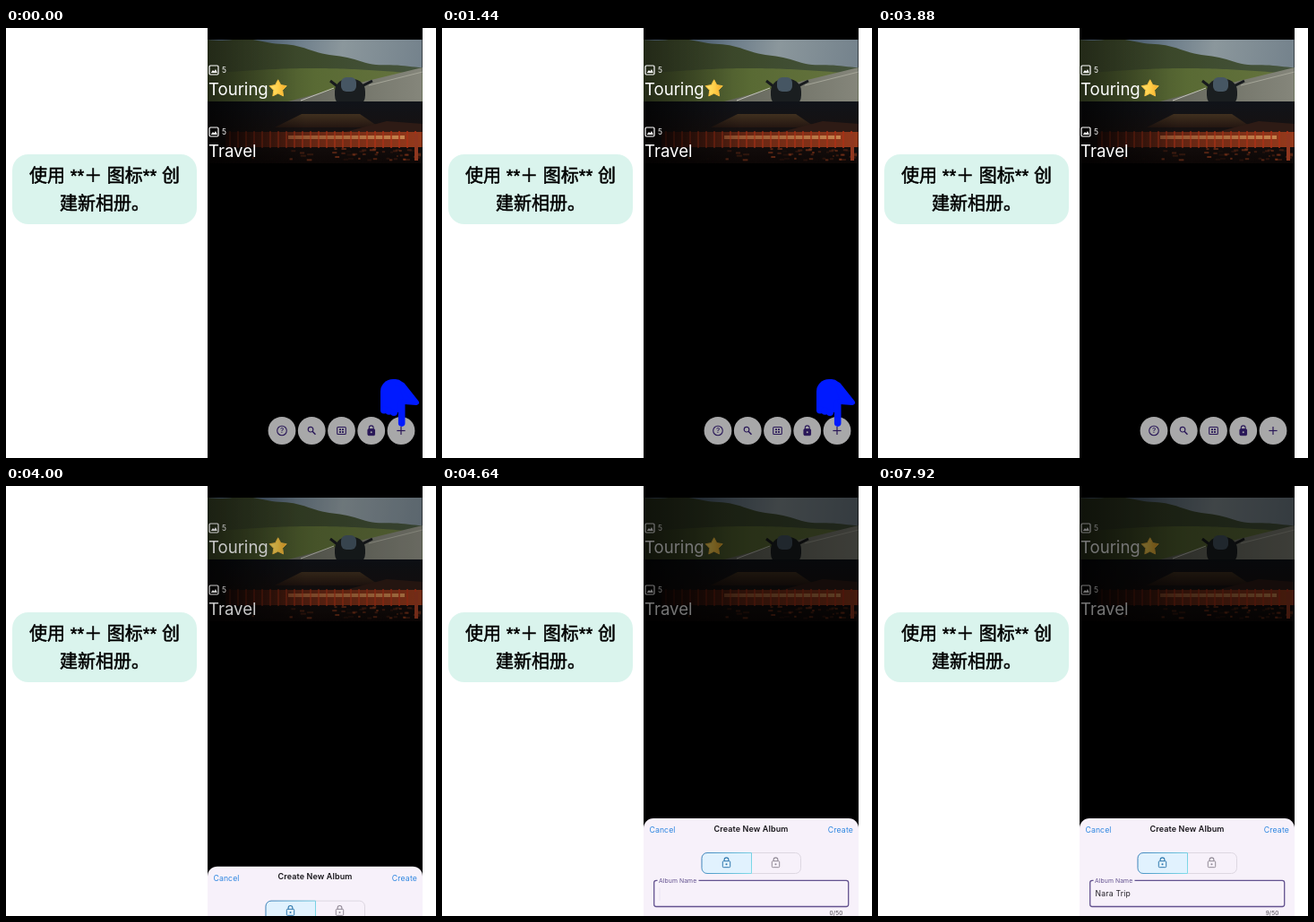
An HTML page with a canvas that plays this animation: 480 by 480 pixels, repeating every 8000 ms.

```html
<!DOCTYPE html>
<html lang="zh">
<head>
<meta charset="utf-8">
<style>
  html, body { margin: 0; width: 100%; height: 100%; overflow: hidden; background: #fff; }
  canvas { display: block; width: 480px; height: 480px; }
</style>
</head>
<body>
<canvas id="stage" width="480" height="480"></canvas>
<script>
const ctx = document.getElementById('stage').getContext('2d');
const LOOP = 8000, STEP = 40, TAU = Math.PI * 2;
const PHONE = { x: 225, w: 240 }, PHOTO_H = 69;
const UI = 'Inter, "Open Sans", sans-serif';
const CJK = '"Liberation Sans", "Noto Sans CJK SC", "Noto Sans CJK", sans-serif';
const INK = '#291758', BUTTON = '#a8a8a9', PURPLE = '#63528f', PAPER = '#f7f1fa';
const ALBUM = 'Nara Trip', FIRST_WORD = 4;

const clamp = v => Math.max(0, Math.min(1, v));
const progress = (t, start, length) => clamp((t - start) / length);
const smooth = u => u * u * (3 - 2 * u);

// Each word is typed at its own steady pace.
const keyTime = i => i < FIRST_WORD ? 5200 + 260 * i : 6520 + 170 * (i - FIRST_WORD);
const typedCount = t => [...ALBUM].filter((_, i) => keyTime(i) <= t).length;

function seeded(seed) {
  return () => (seed = seed * 16807 % 2147483647) / 2147483647;
}

function at(x, y, draw) {
  ctx.save();
  ctx.translate(x, y);
  draw();
  ctx.restore();
}

function text(str, x, y, size, color, { weight = 400, align = 'left', spacing = 0, family = UI } = {}) {
  ctx.font = `${weight} ${size}px ${family}`;
  ctx.letterSpacing = spacing + 'px';
  ctx.textAlign = align;
  ctx.fillStyle = color;
  ctx.fillText(str, x, y);
  return ctx.measureText(str).width;
}

function paint(fill, stroke, width = 1) {
  if (fill) { ctx.fillStyle = fill; ctx.fill(); }
  if (stroke) { ctx.strokeStyle = stroke; ctx.lineWidth = width; ctx.stroke(); }
}

function path(points, ...style) {
  ctx.beginPath();
  points.forEach(p => ctx.lineTo(...p));
  paint(...style);
}

function rect(color, x, y, w, h) {
  ctx.fillStyle = color;
  ctx.fillRect(x, y, w, h);
}

function roundRect(x, y, w, h, r, ...style) {
  ctx.beginPath();
  ctx.roundRect(x, y, w, h, r);
  paint(...style);
}

function circle(x, y, r, ...style) {
  ctx.beginPath();
  ctx.arc(x, y, r, 0, TAU);
  paint(...style);
}

function gradient(x0, y0, x1, y1, ...colors) {
  const g = ctx.createLinearGradient(x0, y0, x1, y1);
  colors.forEach((c, i) => g.addColorStop(i / (colors.length - 1), c));
  return g;
}

function caption() {
  roundRect(7, 141, 206, 78, 18, '#daf4ed');
  ['使用 **＋ 图标** 创', '建新相册。'].forEach((str, i) => {
    const y = 171.5 + 31 * i;
    text(str, 110, y, 20, '#000', { weight: 500, align: 'center', family: CJK });
    ctx.strokeStyle = '#000';
    ctx.lineWidth = 0.5;
    ctx.strokeText(str, 110, y);
  });
}

// Fills everything below the curve y = height(x).
function land(height, fill) {
  const points = [[0, PHOTO_H]];
  for (let x = 0; x <= PHONE.w; x += 4) points.push([x, height(x)]);
  path([...points, [PHONE.w, PHOTO_H]], fill);
}

function roadPhoto() {
  const { w } = PHONE;
  rect(gradient(60, 0, w, 25, '#55697c', '#8b979c', '#74828c'), 0, 0, w, PHOTO_H);
  land(x => 30 * smooth(progress(x, 35, 190)) + Math.sin(x / 9), gradient(0, 0, w, 0, '#323b22', '#3d4a2c', '#46553f'));
  land(x => 38 - 6 * Math.sin(x / 75), gradient(0, 0, w, 0, '#333d20', '#596a34', '#66743f'));
  path([[90, PHOTO_H], [150, 53], [w, 31], [w, PHOTO_H]], gradient(100, 0, w, 0, '#65675c', '#85867b'));
  path([[104, 68], [141, 54]], null, '#c3c4ba', 1);
  path([[180, 51], [w, 36]], null, '#a5a699', 1);
  // motorcycle
  path([[137, 46], [146, 53], [174, 51], [184, 46]], null, '#171a1d', 3);
  roundRect(142, 44, 34, 32, 14, '#1a1e20');
  roundRect(149, 42, 17, 16, 6, '#465663');
  rect(gradient(0, 0, 100, 0, 'rgba(0,0,0,.3)', 'rgba(0,0,0,0)'), 0, 0, w, PHOTO_H);
}

function shrinePhoto() {
  const { w } = PHONE, random = seeded(11);
  rect(gradient(0, 0, 0, PHOTO_H, '#101319', '#171110', '#0d0706'), 0, 0, w, PHOTO_H);
  path([[75, 29], [105, 14], [170, 14], [192, 29]], gradient(0, 14, 0, 29, '#40301f', '#241611'));
  path([[150, 35], [200, 22], [w, 25], [w, 35]], '#2e1b15');
  rect(gradient(20, 0, w, 0, '#2a100b', '#6b2814', '#963a1c'), 20, 34, w, 17);
  rect(gradient(80, 0, w, 0, '#8b4a2a', '#cf8c52'), 90, 38, 130, 4);
  for (let x = 24; x < w; x += 9) rect(`rgba(170,48,22,${0.25 + x / 400})`, x, 33, 2, 19);
  for (let i = 0; i < 55; i++) {
    const x = 25 + 210 * Math.sqrt(random());
    rect(`rgba(185,75,35,${0.5 * random()})`, x, 52 + 13 * random(), 2 + 5 * random(), 2);
  }
  rect('#91371f', 231, 36, 4, 30);
  rect(gradient(0, 0, 110, 0, 'rgba(0,0,0,.75)', 'rgba(0,0,0,0)'), 0, 0, w, PHOTO_H);
}

function album(y, title, photo) {
  at(PHONE.x, y, () => {
    ctx.beginPath();
    ctx.rect(0, 0, PHONE.w - 0.5, PHOTO_H);
    ctx.clip();
    photo();
    roundRect(2, 29, 10, 10, 1.2, null, '#fff', 1.2);
    path([[3.7, 37], [6, 34], [7.4, 35.5], [9, 33], [10.8, 37]], '#fff');
    text('5', 16, 37.2, 8.4, '#fff');
    text(title, 1, 61.5, 18.6, '#fff');
  });
}

function star(cx, cy, r) {
  const points = Array.from({ length: 10 }, (_, i) => {
    const a = i * TAU / 10 - TAU / 4, d = i % 2 ? r * 0.52 : r;
    return [cx + d * Math.cos(a), cy + d * Math.sin(a)];
  });
  path([...points, points[0]], gradient(cx - r, 0, cx + r, 0, '#ffe36e', '#ffd04a', '#f5a623'), '#f8c040', 1);
}

function padlock(size, color, hole, filled) {
  ctx.beginPath();
  ctx.arc(0, -3.2, 2.4, Math.PI, 0);
  ctx.lineTo(2.4, -1.5);
  ctx.moveTo(-2.4, -3.2);
  ctx.lineTo(-2.4, -1.5);
  paint(null, color, 1.1);
  roundRect(-size / 2, -1.8, size, 7, 1, filled && color, color);
  circle(0, 1.8, 1, hole);
}

const icons = [
  () => {
    circle(0, 0, 5.3, null, INK, 1.1);
    text('?', 0, 2.8, 8, INK, { weight: 500, align: 'center' });
  },
  () => {
    circle(-1.2, -1.3, 2.8, null, INK, 1.2);
    path([[0.8, 0.8], [4.2, 4.2]], null, INK, 1.5);
  },
  () => {
    roundRect(-4.8, -4, 9.6, 8, 1, null, INK, 1.1);
    for (const dx of [-2.5, 0.5]) for (const dy of [-2.2, 0.6]) rect(INK, dx, dy, 2, 1.8);
  },
  () => padlock(7.6, INK, BUTTON, true),
  () => {
    path([[-4.6, 0], [4.6, 0]], null, INK, 1.2);
    path([[0, -4.6], [0, 4.6]], null, INK, 1.2);
  },
];

function toolbar() {
  icons.forEach((icon, i) => at(308 + 33.25 * i, 449.5, () => {
    circle(0, 0, 15.4, BUTTON);
    icon();
  }));
}

function pointer(t) {
  if (t >= 1960) return;
  const blue = '#001aff';
  const scale = 1 + 0.22 * Math.sin(Math.PI * progress(t, 500, 940)) ** 2;
  at(439.5, 418.5, () => {
    ctx.scale(scale, scale);
    ctx.lineCap = ctx.lineJoin = 'round';
    roundRect(-21.5, -26.5, 27, 37, [14, 10, 4, 4], blue);
    for (let i = 0; i < 3; i++) circle(-17.5 + 5.5 * i, 8 + 1.2 * i, 4, blue);
    path([[2.2, 0], [2.2, 22.6]], null, blue, 7.6);
    path([[-2, -22], [3, -20], [18.5, -0.5], [5, -1.5]], blue, blue, 6);
  });
}

function caretAlpha(t) {
  const count = typedCount(t);
  const phase = Math.max(0, t - (count ? keyTime(count - 1) : 4000)) % 1000;
  return phase < 750 ? 1 - progress(phase, 500, 150) : progress(phase, 850, 150);
}

function nameField(t) {
  const floated = 1 - (1 - progress(t, 4000, 167)) ** 2.15;
  const rest = 1 - floated;
  roundRect(236.7, 69.3, 217, 29.2, 2.5, null, PURPLE, 1.3);
  rect(PAPER, 240.5, 68, 46 * clamp(floated * 2), 2.6);
  text('Album Name', 242, 72 + 15 * rest, 6.8 + 2.2 * rest, PURPLE, { spacing: 0.1 });

  const count = typedCount(t);
  const width = text(ALBUM.slice(0, count), 242.5, 87.3, 8.6, '#211e25', { spacing: 0.22 });
  text(count + '/50', 447.5, 108.2, 6.5, '#4b464f', { align: 'right', spacing: 0.12 });
  ctx.globalAlpha = caretAlpha(t);
  rect(PURPLE, 242.4 + width, 77.5, 1.2, 14.5);
  ctx.globalAlpha = 1;
}

function sheet(t) {
  const slide = progress(t, 3900, 250);
  if (!slide) return;
  rect(`rgba(0,0,0,${0.54 * slide})`, PHONE.x, 0, PHONE.w, 480);

  at(0, 371 + 149 * (1 - slide) ** 2, () => {
    roundRect(PHONE.x, 0, PHONE.w, 160, [11, 11, 0, 0], PAPER);
    text('Cancel', 231.5, 16, 8.7, '#2e86e0', { spacing: 0.08 });
    text('Create New Album', 345, 14.7, 9, '#17151a', { weight: 600, align: 'center', spacing: 0.12 });
    text('Create', 459, 16, 8.7, '#2e86e0', { align: 'right', spacing: 0.15 });

    roundRect(290, 38.5, 110.5, 23, 6, null, '#ddd7e1');
    roundRect(290, 38.5, 55.5, 23, [6, 0, 0, 6], '#e1f2fe', gradient(290, 38, 345, 61, '#3f84bd', '#7fdbe9'));
    ['#2f78ad', '#918a96'].forEach((color, i) => at(317.5 + 55 * i, 49.5, () => padlock(8.4, color, color)));
    nameField(t);
  });
}

function draw(t) {
  rect('#fff', 0, 0, 480, 480);
  caption();
  ctx.save();
  ctx.beginPath();
  ctx.rect(PHONE.x, 0, PHONE.w, 480);
  ctx.clip();
  rect('#000', PHONE.x, 0, PHONE.w, 480);
  album(13, 'Touring', roadPhoto);
  album(13 + PHOTO_H, 'Travel', shrinePhoto);
  star(303.7, 67.8, 10);
  toolbar();
  sheet(t);
  ctx.restore();
  pointer(t);
}

const start = performance.now();
function frame() {
  const t = (performance.now() - start) % LOOP;
  draw(Math.floor(t / STEP) * STEP);
  requestAnimationFrame(frame);
}
frame();
</script>
</body>
</html>
```
